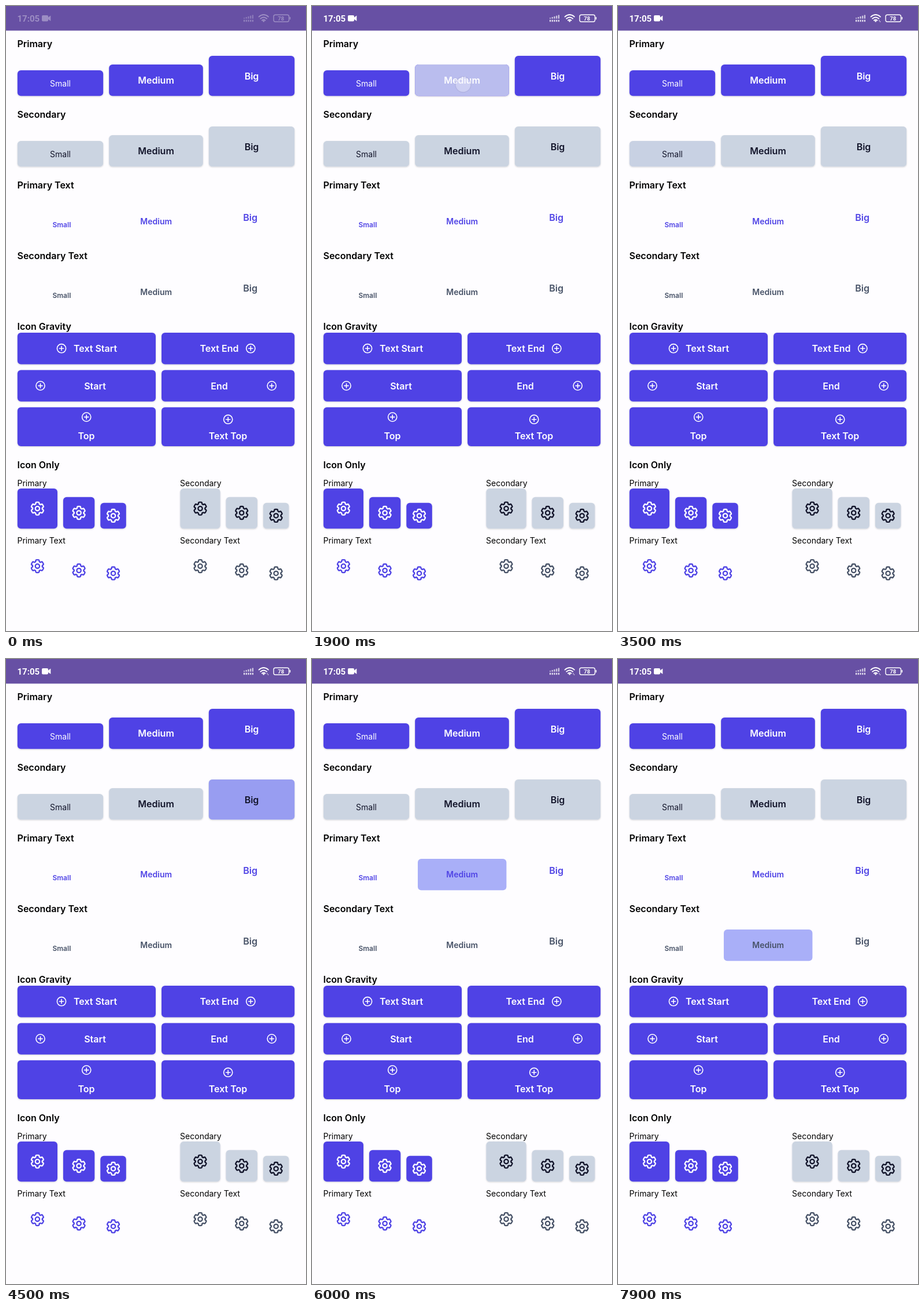
An HTML page that plays this animation: 519x1079 px, repeating every 8000 ms.

```html
<!DOCTYPE html>
<html lang="en">
<head>
<meta charset="utf-8">
<title>Buttons</title>
<style>
  html, body { margin: 0; width: 100%; height: 100%; overflow: hidden; background: #fefdff; }
  svg { display: block; width: 519px; height: 1079px; font-family: Inter, sans-serif; }
  .head { font-size: 16px; font-weight: 600; }
  .label { font-size: 14px; }
  .clock { font: bold 15px Roboto, sans-serif; }
  .charge { font: bold 9.5px Roboto, sans-serif; }
  .mid { text-anchor: middle; }
  .line { fill: none; stroke: currentColor; stroke-linecap: round; stroke-linejoin: round; }
</style>
</head>
<body>
<svg viewBox="0 0 519 1079" xmlns="http://www.w3.org/2000/svg">
  <defs>
    <path id="tooth" d="M-2.62-6.78L-2.41-8.06C-2.32-8.6-1.85-9-1.3-9H1.3C1.85-9 2.32-8.6 2.41-8.06L2.62-6.78C2.68-6.4 2.93-6.09 3.26-5.91L3.48-5.78C3.81-5.59 4.2-5.53 4.56-5.66"/>
    <g id="gear" class="line" stroke-width="1.9"><circle r="3"/></g>
    <g id="plus" class="line" stroke-width="1.6"><circle r="7.6"/><path d="M-3.6 0H3.6M0-3.6V3.6"/></g>
    <filter id="shade" x="-5%" y="-10%" width="110%" height="125%">
      <feDropShadow dx="0" dy="1" stdDeviation=".9" flood-color="#334" flood-opacity=".22"/>
    </filter>
  </defs>

  <rect width="519" height="42.5" fill="#6750a4"/>
  <g id="status" fill="#fff" color="#fff">
    <text class="clock" x="19.5" y="27">17:05</text>
    <rect x="62" y="16" width="11" height="10.5" rx="2"/>
    <path d="M72.5 20L77.3 16.5V26L72.5 22.5Z"/>
    <g id="signal"></g>
    <g class="line" stroke-width="1.9">
      <path d="M437.5 18.6Q445.7 11.6 453.9 18.6M440.3 21.8Q445.7 17.2 451.1 21.8M443 24.8Q445.7 22.6 448.4 24.8"/>
    </g>
    <circle cx="445.7" cy="26.3" r="1.4"/>
    <path id="traffic" d="M450.8 26L452 24.2L453.2 26ZM452.3 26.5H454.7L453.5 28.3Z"/>
    <rect class="line" x="463" y="15.2" width="26.5" height="12" rx="3" stroke-width="1.4"/>
    <rect x="490.6" y="18.8" width="1.6" height="4.8" rx=".8"/>
    <text class="charge mid" x="475.8" y="24.7">78</text>
  </g>

  <g id="headings"></g>
  <g id="buttons"></g>
  <g id="ripples"></g>
  <g id="captions"></g>
  <g id="icons"></g>
  <circle id="touch" r="13.5" fill="#f1f1fc" fill-opacity=".72" stroke="#9c9ccb" stroke-opacity=".75" stroke-width="1.4"/>
</svg>

<script>
const LOOP = 8000;
const INDIGO = '#4f43e5', SLATE = '#cbd4e1', INK = '#12142a', GRAY = '#475267';
const $ = id => document.getElementById(id);
const add = (id, markup) => $(id).insertAdjacentHTML('beforeend', markup);
const clamp = v => Math.max(0, Math.min(1, v));

const button = (x, y, w, h, fill) =>
  add('buttons', `<rect x="${x}" y="${y}" width="${w}" height="${h}" rx="6" fill="${fill}" filter="url(#shade)"/>`);
const caption = (text, x, y, fill, size = 16, weight = 600) =>
  add('captions', `<text class="mid" x="${x}" y="${y + size * .36}" fill="${fill}" font-size="${size}" font-weight="${weight}">${text}</text>`);
const heading = (text, x, y, kind = 'head') =>
  add('headings', `<text class="${kind}" x="${x}" y="${y}">${text}</text>`);
const icon = (name, x, y, color, scale = 1) =>
  add('icons', `<use href="#${name}" transform="translate(${x} ${y}) scale(${scale})" color="${color}"/>`);

for (let k = 0; k < 6; k++) {
  add('gear', `<use href="#tooth" transform="rotate(${k * 60})"/>`);
}
for (let k = 0; k < 5; k++) {
  const x = 411 + k * 3.7, top = 20.3 - k * 1.2;
  add('signal', `<rect x="${x}" y="${top}" width="2.2" height="${21.8 - top}" opacity=".7"/>
    <rect x="${x}" y="23.8" width="2.2" height="3.4" opacity=".8"/>`);
}

['Primary', 'Secondary', 'Primary Text', 'Secondary Text', 'Icon Gravity']
  .forEach((text, i) => heading(text, 19.5, 70.7 + i * 122));
heading('Icon Only', 19.5, 797.5);

// Columns as [x, width, height]; every row is aligned to its bottom edge.
const solid = [[19.8, 148.4, 44.3], [178.2, 162.6, 54.3], [350.8, 148.4, 69.2]];
const flat = [[19.8, 153.2, 44.3], [183, 153.4, 54.3], [346.2, 153, 69.2]];
const names = ['Small', 'Medium', 'Big'];
const rows = [
  { cols: solid, fill: INDIGO, text: '#fff', ripple: '#babdee' },
  { cols: solid, fill: SLATE, text: INK, ripple: '#989df1' },
  { cols: flat, text: INDIGO, ripple: '#a9aff8' },
  { cols: flat, text: GRAY, ripple: '#a9aff8' }
];
const downs = [1000, 1650, 2300, 3050, 3600, 4200, 4850, 5700, 6270, 6950, 7600];
const taps = [];

rows.forEach((row, r) => row.cols.forEach(([x, w, h], c) => {
  const bottom = 155.2 + r * 122, y = bottom - h, cx = x + w / 2, cy = y + h / 2;
  if (row.fill) {
    button(x, y, w, h, row.fill);
    caption(names[c], cx, cy + .5, row.text, c ? 16 : 14, c ? 600 : 400);
  } else {
    caption(names[c], cx, cy + .4, row.text, 12 + c * 2);
  }
  const n = r * 3 + c, down = downs[n];
  if (down === undefined) return;
  const px = cx + (c === 2 ? -4 : 2), py = cy + 7.5;
  add('ripples', `<clipPath id="clip${n}"><rect x="${x}" y="${y}" width="${w}" height="${h}" rx="6"/></clipPath>
    <g clip-path="url(#clip${n})"><circle id="wave${n}" cx="${px}" cy="${py}" fill="${row.ripple}"/></g>`);
  taps.push({ down, px, py, reach: Math.hypot(w, h) / 2 + 12, wave: $('wave' + n) });
}));

[[564, 54.4], [628.4, 54.4], [692.7, 67.3]].forEach(([y, h]) => {
  button(19.8, y, 239.2, h, INDIGO);
  button(269, y, 230.2, h, INDIGO);
});
[['Text Start', 154.5, 591.5], ['Text End', 369, 591.5], ['Start', 154, 656], ['End', 369, 656],
 ['Top', 139, 742], ['Text Top', 384, 742]].forEach(([text, x, y]) => caption(text, x, y, '#fff'));
[[96, 591.2], [423.3, 591.2], [59.5, 655.6], [459.7, 655.6], [139.2, 709.6], [384.2, 713.7]]
  .forEach(([x, y]) => icon('plus', x, y, '#fff'));

// Icon-only groups: [left, title, fill, icon on fill, icon on plain].
[[19.8, 'Primary', INDIGO, '#fff', INDIGO], [301.4, 'Secondary', SLATE, INK, GRAY]]
  .forEach(([left, title, fill, onFill, onPlain]) => {
    heading(title, left - .3, 828.5, 'label');
    heading(title + ' Text', left - .3, 928, 'label');
    [[0, 69.2], [79.1, 54.4], [143.5, 44.5]].forEach(([dx, size]) => {
      const cx = left + dx + size / 2, cy = 902.2 - size / 2;
      button(left + dx, 902.2 - size, size, size, fill);
      icon('gear', cx, cy, onFill, 1.22);
      icon('gear', cx, cy + 99.5, onPlain, 1.22);
    });
  });

function draw() {
  const t = performance.now() % LOOP;
  $('status').setAttribute('opacity', .35 + .65 * clamp((t - 400) / 200));
  $('traffic').setAttribute('opacity', t < 2200 ? 0 : .8);
  let glow = 0;
  for (const { down, px, py, reach, wave } of taps) {
    const age = t - down, live = age >= 0 && age < 460;
    const grow = 1 - (1 - clamp(age / 180)) ** 2;
    wave.setAttribute('r', live ? reach * grow : 0);
    wave.setAttribute('opacity', live ? clamp(age / 80) * clamp((460 - age) / 140) : 0);
    if (age >= 0 && age < 280) {
      glow = clamp((280 - age) / 60);
      $('touch').setAttribute('cx', px);
      $('touch').setAttribute('cy', py);
    }
  }
  $('touch').setAttribute('opacity', glow);
  requestAnimationFrame(draw);
}
draw();
</script>
</body>
</html>
```
